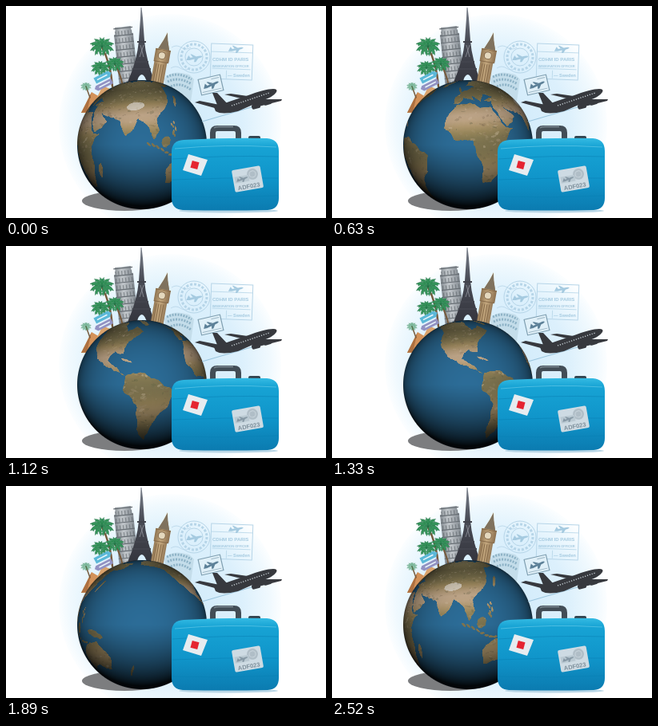
Write an HTML page with a canvas that moves like this. It is 400x266 px and loops after 2.59 s.

```html
<!DOCTYPE html>
<html lang="en">
<head>
<meta charset="utf-8">
<title>Travel globe</title>
<style>
html, body { margin: 0; width: 100%; height: 100%; overflow: hidden; background: #fff; }
svg, canvas { position: absolute; left: 0; top: 0; width: 400px; height: 266px; }
text { font-family: "Liberation Sans", Arial, sans-serif; font-weight: bold; }
</style>
</head>
<body>
<svg viewBox="0 0 400 266">
  <defs>
    <radialGradient id="halo">
      <stop offset="0" stop-color="#cfeafa"/><stop offset=".65" stop-color="#dcf0fc"/>
      <stop offset=".9" stop-color="#f0f9fe"/><stop offset="1" stop-color="#fcfeff"/>
    </radialGradient>
    <linearGradient id="stone"><stop stop-color="#858c92"/><stop offset=".4" stop-color="#c3c8cc"/><stop offset="1" stop-color="#858c93"/></linearGradient>
    <linearGradient id="gold"><stop stop-color="#8e7350"/><stop offset=".45" stop-color="#c4a87e"/><stop offset="1" stop-color="#8b7050"/></linearGradient>
    <linearGradient id="iron" x2="0" y2="1"><stop stop-color="#7b828d"/><stop offset=".4" stop-color="#4a4d57"/><stop offset="1" stop-color="#33343c"/></linearGradient>
    <path id="jet" d="M-13 4L-9 -4L-6 0L8 -3Q13 -4 14 -2Q12 0 7 1L3 7H0L1 2L-7 4ZM-2 -1L-6 -6H-4L4 -2Z"/>
    <path id="frond" d="M0 0Q9 -9 18 1Q14 0 14 3Q11 -1 9 2Q7 -2 0 0"/>
    <g id="crown"></g>
  </defs>
  <circle cx="205" cy="149" r="139" fill="url(#halo)"/>
  <ellipse cx="148" cy="244.500" rx="53" ry="12.500" fill="#7c7d7f"/>

  <!-- passport stamps -->
  <g fill="none" stroke="#b6d5e8">
    <circle cx="235" cy="64" r="20"/><circle cx="235" cy="64" r="16" stroke-width="3" stroke-dasharray="3 2"/><circle cx="235" cy="64" r="11"/>
    <path d="M207 52q6 -4 12 0t12 0M206 78q6 -4 12 0t12 0" stroke-width=".8"/>
    <g transform="rotate(2 282 70)"><rect x="256" y="48" width="52" height="44"/><path d="M256 58h52M258 79h48M276 81v10" stroke-width=".8"/></g>
  </g>
  <g fill="#a5cae0">
    <use href="#jet" transform="translate(235 65) scale(.75)"/><use href="#jet" transform="translate(287 54) scale(.7)"/>
    <text x="258" y="69" font-size="6">CDHM ID PARIS</text>
    <text x="258" y="77" font-size="4">IMMIGRATION OFFICER</text>
    <text x="277" y="89" font-size="5.500">— Sweden</text>
  </g>

  <!-- arena -->
  <path d="M198 91Q207 79 229 86L235 92L231 120L200 108Z" fill="#c4ddea"/>
  <g fill="none" stroke="#8db2c6" stroke-width="3" stroke-dasharray="2 1.500">
    <path d="M201 89Q215 82 232 92"/><path d="M202 95Q216 88 232 98"/><path d="M206 101Q218 95 231 105"/>
  </g>
  <g transform="translate(256 99) rotate(-13)">
    <rect x="-14" y="-10" width="28" height="20" fill="#e0f0f8" stroke="#7f9fb1" stroke-width="1.200"/>
    <path d="M-12 7H12M2 -7H12" stroke="#9ab5c4"/><use href="#jet" transform="scale(.75)" fill="#5d8198"/>
  </g>

  <!-- leaning tower -->
  <g transform="translate(146 26) rotate(-6)">
    <path d="M-10 0H10V9H12V78H-12V9H-10Z" fill="url(#stone)"/>
    <path d="M0 1V72" stroke="#666d73" stroke-width="24" stroke-dasharray="1.200 7.800"/>
    <path d="M-11 0V70M-7 0V70M-3 0V70M1 0V70M5 0V70M9 0V70" transform="translate(1 5)" stroke="#5e656b" stroke-width="1.300" stroke-dasharray="5 4" opacity=".6"/>
  </g>

  <!-- iron tower -->
  <path d="M168.500 2H169.500L171 15L173 44Q175 68 187 98H177Q170 74 162 98H151Q164 68 166 44L168 15Z" fill="url(#iron)"/>
  <path d="M164 45H175M161 70H178M158 79H181" stroke="#42444d" stroke-width="2"/>
  <path d="M168 49L172 64M172 49L167 64" stroke="#92959d" stroke-width=".8"/>

  <!-- clock tower -->
  <g transform="translate(202 33) rotate(10)">
    <path d="M0 0L2 10L6 22H8V37L6 39V66H-10V39L-11 37V22H-8L-3 10Z" fill="url(#gold)"/>
    <path d="M-8 22L-3 10L0 1L2 10L6 22Z" fill="#7f725e"/>
    <path d="M-7 41V66M-4 41V66M-1 41V66M2 41V66M-11 38H8M-11 23H8" stroke="#806444" stroke-width=".8"/>
    <circle cx="-2" cy="30" r="4.500" fill="#e4d8bd" stroke="#80674a"/>
  </g>

  <!-- pyramids, signs and palms -->
  <path d="M94 134L107 108L124 118L116 134Z" fill="#d3925a"/><path d="M107 108L101 133L94 134Z" fill="#ad7040"/>
  <path d="M111 120L121 100L137 107L130 120Z" fill="#d9a36c"/>
  <g fill="none" stroke="#765a3c" stroke-linecap="round">
    <path d="M120 52Q131 72 133 101" stroke-width="2.500"/><path d="M136 73Q143 85 146 100" stroke-width="2"/><path d="M100 101L105 115" stroke-width="1.500"/>
  </g>
  <g fill="#35935a" stroke="#1c6b40" stroke-width=".5">
    <use href="#crown" transform="translate(120 51) scale(.9)"/><use href="#crown" transform="translate(136 73) scale(.7)"/>
    <use href="#crown" transform="translate(118 78) scale(.7)"/><use href="#crown" transform="translate(100 101) scale(.4)" opacity=".6"/>
  </g>
  <g transform="translate(122 93) rotate(-27)">
    <path d="M-10 -8H9L13 -4L9 0H-10Z" fill="#5bb8d8"/><path d="M-12 2H9V9H-12L-15 5Z" fill="#9292c2"/>
    <path d="M-7 -4H7M-9 5.500H6" stroke="#e9f5fb" stroke-width="1.500"/>
  </g>
</svg>

<canvas id="globe" width="400" height="266"></canvas>

<svg viewBox="0 0 400 266">
  <defs>
    <linearGradient id="shell" x2="0" y2="1">
      <stop stop-color="#35bbe3"/><stop offset=".12" stop-color="#17a3d4"/>
      <stop offset=".55" stop-color="#1095ca"/><stop offset="1" stop-color="#0b7bb0"/>
    </linearGradient>
  </defs>
  <!-- airliner -->
  <path d="M245 145L334 119" fill="none" stroke="#9cc6de" stroke-width="1.300"/>
  <g fill="#37393e">
    <path d="M260 127Q278 120 300 113Q324 104 334 104Q340 104 338 108Q334 114 322 118L290 132Q270 137 262 132Z"/>
    <path d="M258 109H264L278 124L266 129ZM236 121L242 119L272 125L268 130ZM273 111L281 110L309 114L302 118Z"/>
    <path d="M298 122L318 117L345 117L344 119L316 126Z"/>
    <rect x="307" y="123" width="11" height="6" rx="2.500" transform="rotate(-15 312 126)"/><rect x="322" y="119" width="10" height="5" rx="2" transform="rotate(-15 327 121)"/>
  </g>
  <path d="M282 125L329 109" stroke="#cfd9df" stroke-width="1.300" stroke-dasharray="1.200 1.800"/>

  <!-- suitcase -->
  <ellipse cx="278" cy="257" rx="62" ry="2.500" fill="#b9d6e6"/>
  <path d="M258.500 169V159Q258.500 153.500 264 153.500H285Q290.500 153.500 290.500 159V169" fill="none" stroke="#424d56" stroke-width="7"/>
  <path d="M260 153Q262 151.500 266 151.500H284" fill="none" stroke="#7f8d96" stroke-width="1.300"/>
  <rect x="303" y="163" width="15" height="5" rx="2" fill="#34444f"/>
  <path d="M222 168Q274 165 326 166Q341 167 341 182V241Q341 255 327 256Q274 257 221 256Q207 255 207 241V183Q207 169 222 168Z" fill="url(#shell)"/>
  <g fill="none" stroke="#087fb2" opacity=".5">
    <path d="M211 179Q274 173 338 177" stroke="#7ed6ee"/>
    <path d="M208 192Q274 187 340 189M208 218Q274 215 340 216M208 239Q274 241 340 238"/>
  </g>
  <path d="M228 186L252 193L244 213L221 206Z" fill="#e6ecf0"/>
  <rect x="231.500" y="195" width="9" height="9" fill="#e52531" transform="rotate(15 236 199.500)"/>
  <g transform="translate(302 217) rotate(-10)">
    <rect x="-18" y="-14" width="36" height="28" rx="2" fill="#cedbe3"/>
    <circle cx="7" cy="-5" r="7" fill="#b0bec7"/><circle cx="7" cy="-5" r="4" fill="none" stroke="#c9d5dc"/>
    <rect x="-16" y="-5" width="18" height="8" fill="#bac9d2"/><use href="#jet" transform="translate(-7 -1) scale(.55)" fill="#8799a5"/>
    <text x="-14" y="12" font-size="7.500" fill="#7e8f9b">ADF023</text>
  </g>
</svg>

<script>
const STEP = 70, STEPS = 37, START_LON = 92;
const CX = 170, CY = 174, R = 81, ROLL = .07, LAT_STRETCH = 1.09;
const SCALE = 3, W = 360 * SCALE, H = 180 * SCALE;
const DEG = 180 / Math.PI;

let seed = 7;
const random = () => (seed = seed * 16807 % 2147483647) / 2147483647;
const spread = width => (random() - .5) * width;

// Palm crown: fronds fanned out on both sides
let fronds = '';
for (let angle = -80; angle <= 80; angle += 32)
  for (const side of [1, -1])
    fronds += `<use href="#frond" transform="scale(${side} 1) rotate(${angle}) scale(${1 - Math.abs(angle) / 300})"/>`;
document.getElementById('crown').innerHTML = fronds;

const map = Object.assign(document.createElement('canvas'), { width: W, height: H });
const m = map.getContext('2d');
m.setTransform(SCALE, 0, 0, -SCALE, W / 2, H / 2);

// Pale deserts near the tropics, darker green elsewhere, grey towards the poles
const climate = m.createLinearGradient(0, -90, 0, 90);
for (let lat = -90; lat <= 90; lat += 5) {
  const dry = Math.exp(-(((Math.abs(lat) - 24) / 13) ** 2)) * (lat < 0 ? .6 : 1);
  const cold = Math.max(0, Math.abs(lat) - 55) / 35;
  climate.addColorStop((lat + 90) / 180, `hsl(${48 - 16 * dry} ${22 + 10 * dry}% ${38 + 28 * dry + 45 * cold}%)`);
}

// Fractal coast between two points
function coast(x1, y1, x2, y2) {
  const length = Math.hypot(x2 - x1, y2 - y1);
  if (length < 2) return m.lineTo(x2, y2);
  const x = (x1 + x2) / 2 + spread(length * .22), y = (y1 + y2) / 2 + spread(length * .22);
  coast(x1, y1, x, y);
  coast(x, y, x2, y2);
}

function land(...p) {
  const n = p.length;
  m.beginPath();
  m.moveTo(p[0], p[1]);
  for (let i = 0; i < n; i += 2) coast(p[i], p[i + 1], p[(i + 2) % n], p[(i + 3) % n]);
  m.fillStyle = climate;
  m.fill();
}

function island(lon, lat, length, width, tilt) {
  const ring = [];
  for (let a = 0; a < 6; a += Math.PI / 4) {
    const u = length * Math.cos(a), v = width * Math.sin(a), t = tilt / DEG;
    ring.push(lon + u * Math.cos(t) - v * Math.sin(t), lat + u * Math.sin(t) + v * Math.cos(t));
  }
  land(...ring);
}

function blot(lon, lat, rx, ry, color, alpha) {
  m.globalAlpha = alpha;
  m.fillStyle = color;
  m.beginPath();
  m.ellipse(lon, lat, rx, ry, spread(1), 0, 7);
  m.fill();
}

function paintMap() {
  // Africa, Eurasia, the Americas, Australia
  land(-17,15, -10,30, -5,36, 10,37, 20,31, 33,31, 43,12, 51,11, 40,-5, 40,-16, 27,-34, 18,-34, 9,3, -8,5);
  land(-9,37, -8,44, 5,52, 25,58, 8,60, 25,71, 100,76, 178,67, 140,56, 128,38, 121,31, 108,20, 109,11,
    103,3, 98,16, 90,22, 78,8, 72,21, 57,26, 48,30, 58,21, 44,13, 35,30, 36,37, 27,38, 41,42, 30,46, 23,37,
    13,45, 16,38, 3,43, -2,37);
  land(-165,62, -156,71, -95,70, -80,52, -65,60, -56,50, -70,43, -81,27, -90,30, -97,22, -88,16, -79,8,
    -95,16, -106,22, -122,37, -126,50, -150,60);
  land(-78,8, -60,9, -35,-6, -40,-20, -57,-37, -68,-54, -74,-45, -70,-18, -81,-5);
  land(114,-22, 130,-12, 142,-11, 153,-26, 147,-38, 131,-32, 116,-35);

  island(-42, 72, 13, 10, 80);   // Greenland
  island(-2, 54, 5, 2, 110);     // Britain
  island(47, -19, 7, 2.5, 70);   // Madagascar
  island(114, 1, 5, 4, 50);      // Borneo
  island(141, -5, 10, 3, -20);   // New Guinea
  island(138, 37, 8, 1.5, 50);   // Japan
  island(173, -41, 7, 1.5, 55);  // New Zealand
  island(-77, 21, 6, 1, -20);    // Cuba
  for (let k = 0; k < 8; k++) {
    island(98 + 4 * k, 4 * Math.cos(k / 2) - 4 - k / 2, 2.3, 1, k < 4 ? -45 : 0);
    island(123 + spread(5), 6 + 1.5 * k, 1.5, 1, 100);
  }

  m.globalCompositeOperation = 'source-atop';
  blot(88, 34, 10, 4, '#e6dfd2', .8);
  const tones = ['#55583c', '#e3d2b8', '#75604a', '#b59f82'];
  for (let i = 0; i < 2600; i++)
    blot(spread(360), spread(150), .4 + random() * 2.4, .3 + random(), tones[i % 4], .08 + random() * .22);
  m.globalCompositeOperation = 'destination-over';
  blot(0, 0, 400, 200, '#2b6a94', 1);
}

// Every visible point of the sphere with its place on the map and its light
const size = 2 * R + 2, surface = [];
for (let j = 0; j < size; j++) for (let i = 0; i < size; i++) {
  const x = (i + .5 - size / 2) / R, y = (j + .5 - size / 2) / R, d = Math.hypot(x, y);
  if (d > 1 + .5 / R) continue;
  const z = Math.sqrt(Math.max(0, 1 - d * d));
  const u = x * Math.cos(ROLL) - y * Math.sin(ROLL), v = x * Math.sin(ROLL) + y * Math.cos(ROLL);
  const lat = Math.asin(Math.max(-1, Math.min(1, v))) * DEG / LAT_STRETCH;
  surface.push({
    at: (j * size + i) * 4,
    lon: Math.atan2(u, z) * DEG,
    row: Math.floor((90 + lat) * SCALE) * W,
    light: Math.max(.06, .22 + .8 * z ** .7 - .55 * Math.max(0, y)),
    alpha: 255 * Math.min(1, (1 - d) * R + .5)
  });
}

paintMap();
const texture = m.getImageData(0, 0, W, H).data;
const ctx = document.getElementById('globe').getContext('2d');
const image = ctx.createImageData(size, size);

let shown = -1;
function draw(now) {
  const step = Math.floor(now / STEP) % STEPS;
  if (step !== shown) {
    shown = step;
    const center = START_LON - 360 * step / STEPS;
    for (const p of surface) {
      const column = Math.floor((center + p.lon + 900) % 360 * SCALE);
      const from = (p.row + column) * 4;
      for (let c = 0; c < 3; c++) image.data[p.at + c] = texture[from + c] * p.light;
      image.data[p.at + 3] = p.alpha;
    }
    ctx.putImageData(image, CX - size / 2, CY - size / 2);
  }
  requestAnimationFrame(draw);
}
draw(performance.now());
</script>
</body>
</html>
```
